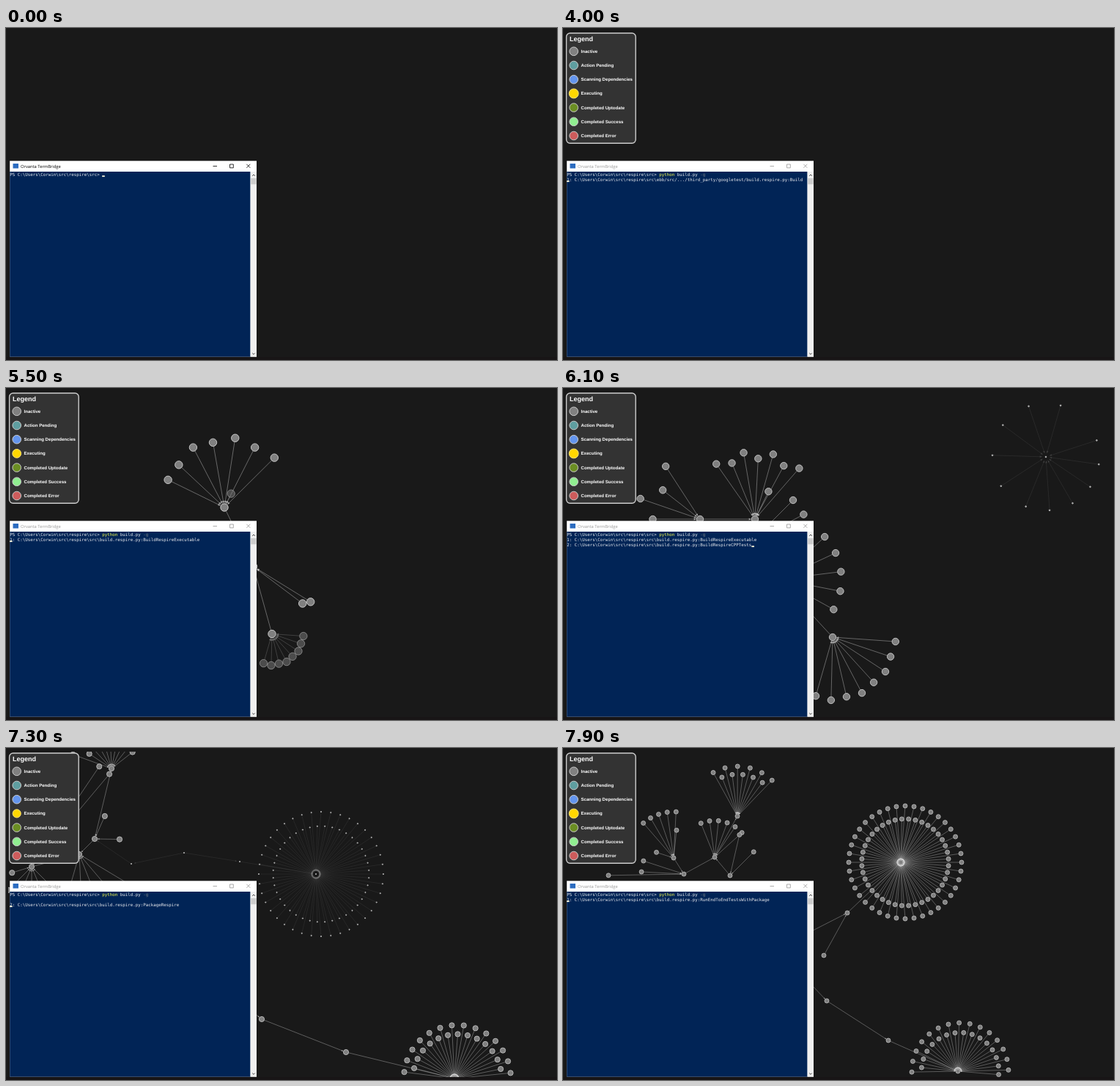
Recreate the animation shown at these times as an HTML page with a canvas. Size 752 by 453 pixels, loop 8000 ms.

```html
<!DOCTYPE html>
<html lang="en">
<head>
<meta charset="utf-8">
<title>Build graph</title>
<style>
html, body { margin: 0; width: 752px; height: 453px; overflow: hidden; background: #191919; }
canvas, svg { position: absolute; left: 0; top: 0; display: block; }
text { white-space: pre; text-rendering: geometricPrecision; }
.term text { font: 5.825px "DejaVu Sans Mono", "Liberation Mono", monospace; fill: #eeedf0; }
.legend text { font: bold 6.1px "Liberation Sans", Arial, sans-serif; fill: #fff; }
.legend .head { font-size: 9px; }
.bar { --ink: #000; }
.bar.idle { --ink: #999; }
.bar text { font: 5.8px "Open Sans", "Noto Sans", sans-serif; fill: var(--ink); }
.bar path { fill: none; stroke: var(--ink); stroke-width: .8; }
</style>
</head>
<body>
<canvas id="graph" width="752" height="453"></canvas>
<svg width="752" height="453" viewBox="0 0 752 453">
  <rect y="449" width="752" height="4" fill="#181516"/>
  <g class="legend" id="legend" visibility="hidden">
    <rect x="4.6" y="7" width="94.6" height="150.2" rx="5" fill="#333" stroke="#ccc" stroke-width="1.4"/>
    <text class="head" x="9" y="17.8">Legend</text>
  </g>
  <rect x="5.2" y="181.3" width="336.8" height="267.2" fill="#fff"/>
  <g class="bar" id="bar">
    <rect x="9.5" y="185" width="7.5" height="6.5" fill="#2c6cc0"/>
    <text x="20" y="190.6">Orvanta TermBridge</text>
    <path d="M282.5 188.5h5.5M305.5 186h4.8v4.8h-4.8zM328.3 185.8l5 5m0-5l-5 5"/>
  </g>
  <rect x="5.2" y="196" width="328.4" height="252.6" fill="#012456"/>
  <rect x="333.6" y="196" width="8.4" height="252.6" fill="#f0f0f0"/>
  <rect x="334.3" y="205" width="7.4" height="8.3" fill="#cdcdcd"/>
  <path d="M336.2 201.8l1.8-1.8 1.8 1.8M336.2 443.6l1.8 1.8 1.8-1.8" fill="none" stroke="#444"/>
  <g class="term">
    <text id="prompt" x="5.2" y="202"></text>
    <text x="131.2" y="202"><tspan id="exe" fill="#ffff4d"></tspan><tspan id="arg"></tspan><tspan id="flag" fill="#7d8086"></tspan></text>
    <text id="row1" x="5.2" y="209"></text>
    <text id="row2" x="5.2" y="216"></text>
    <rect id="cursor" width="3.6" height="1.8" fill="#fef9dc"/>
  </g>
</svg>
<script>
const LOOP = 8000, STEP = 100, BUSY = 3700, CHAR = 3.505;
const $ = id => document.getElementById(id);
const lerp = (a, b, p) => a + (b - a) * p;
const clamp = v => Math.max(0, Math.min(1, v));

/* Legend */
const states = [
  ['Inactive', '#808080'], ['Action Pending', '#5f9ea0'], ['Scanning Dependencies', '#6495ed'],
  ['Executing', '#ffd700'], ['Completed Uptodate', '#6b8e23'],
  ['Completed Success', '#90ee90'], ['Completed Error', '#cd5c5c']
];
$('legend').insertAdjacentHTML('beforeend', states.map(([label, color], i) => {
  const y = 31.8 + i * 19.2, hot = label === 'Executing';
  return `<circle ${hot ? 'id="pulse"' : ''} cx="14.7" cy="${y}" r="5.8" fill="${color}"
    stroke="${hot ? '#ffe680' : '#ccc'}"/><text x="24.5" y="${y + 1.9}">${label}</text>`;
}).join(''));

/* Terminal */
const root = 'C:\\Users\\Corwin\\src\\respire\\src';
const command = 'python build.py -g';
const job = (n, path) => `${n}: ${root}\\${path}`;
const ebb = job(1, 'ebb/src/build.respire.py:Build');
const gtest = job(1, 'ebb/src/.../third_party/googletest/build.respire.py:Build');
const exe = job(1, 'build.respire.py:BuildRespireExecutable');
// start, first row, second row, cursor row, cursor at the end of its row
const output = [
  [0, '', '', 1, false],
  [3700, ebb, '', 1, true],
  [3900, gtest, '', 1, false],
  [4400, gtest, job(2, 'ebb/src/build.respire.py:Build'), 2, true],
  [4700, ebb, '', 1, true],
  [5300, exe, '', 1, false],
  [5800, exe, job(2, 'build.respire.py:BuildRespireCPPTests'), 2, true],
  [6500, job(1, 'build.respire.py:BuildRespireCPPTests'), '', 1, true],
  [7000, '', job(2, 'build.respire.py:PackageRespire'), 2, false],
  [7600, job(1, 'build.respire.py:RunEndToEndTestsWithPackage'), '', 1, false]
];
$('prompt').textContent = `PS ${root}>`;

function drawTerminal(t) {
  const keys = (t - 1000) / STEP + 1 - (t >= 2300 ? 1 : 0);
  const n = Math.max(0, Math.min(command.length, keys));
  const typed = command.slice(0, n);
  $('exe').textContent = typed.slice(0, 7);
  $('arg').textContent = typed.slice(7, 16);
  $('flag').textContent = typed.slice(16);

  const [, a, b, line, atEnd] = output.filter(o => o[0] <= t).pop();
  $('row1').textContent = a;
  $('row2').textContent = b;

  const typing = t < 3100;
  const row = typing ? 0 : line;
  const col = typing ? 36 + n : atEnd ? [a, b][line - 1].length : 0;
  const off = [[1500, 1700], [2800, 3000], [3200, BUSY]].some(([s, e]) => t >= s && t < e);
  $('cursor').setAttribute('x', 5 + col * CHAR);
  $('cursor').setAttribute('y', 201.3 + row * 7);
  $('cursor').setAttribute('visibility', off ? 'hidden' : 'visible');
}

/* Graph: hubs with fans of leaves, moving between poses */
const poseTime = [4100, 4900, 6100, 7300, 7900];
const poseSize = [5.8, 5.7, 4.7, 3.6, 3];

// Leaves on an arc in degrees; every second one at depth times the radius
function fan(count, radius, from, to = from, depth = 1, drift = 0) {
  return Array.from({ length: count }, (_, i) => {
    const a = lerp(from, to, count > 1 ? i / (count - 1) : 0) * Math.PI / 180;
    const r = i % 2 ? radius * depth : radius;
    return { x: drift + r * Math.cos(a), y: r * Math.sin(a) };
  });
}

function hub(x, y, ...fans) {
  const leaves = fans.flat().map(l => ({ x: x + l.x, y: y + l.y }));
  return { x, y, leaves, grow: 1, show: 1 };
}

// A hub that has only just appeared
const seed = (...args) => ({ ...hub(...args), grow: 0 });

const clusters = {
  A: {
    1: hub(334, 147, fan(7, 101, 180, 319)),
    2: hub(262, 179, fan(7, 92, 235, 311, .9), fan(1, 42, 296)),
    3: hub(144, 28, fan(10, 56, 200, 322, .65)),
    4: hub(238, 93, fan(11, 68, 241, 314, .84))
  },
  B: {
    1: hub(380, 226, fan(2, 99, 34, 59), fan(3, 150, 126, 179)),
    2: hub(295, 261, fan(5, 85, 29, -43))
  },
  C: { 1: hub(379, 243, fan(1, 107, 81)) },
  D: { 1: hub(479, 236, fan(3, 105, -30, 35)) },
  E: { 1: hub(451, 181) },
  F: { 1: hub(358, 331), 2: hub(368, 340, fan(8, 86, 4, 106, .97)) },
  G: { 1: hub(350, 441) },
  J: { 2: hub(256, 211, fan(2, 82, -45, -28)) },
  X: {
    2: hub(187, 179, fan(4, 86, 237, 180, .75)),
    3: hub(100, 145, fan(5, 80, 106, 31)),
    4: hub(207, 149, fan(6, 50, 248, 318))
  },
  W: {
    3: hub(121, 124, fan(2, 34, -66, 1)),
    4: hub(228, 174, fan(2, 57, -77, -45, .8))
  },
  Y: {
    3: hub(35, 162, fan(1, 28, 163), fan(2, 165, -56, -50), fan(5, 45, 135, 45)),
    4: hub(165, 172, fan(1, 103, 179), fan(2, 58, 183, 198))
  },
  Z: { 4: hub(151, 150, fan(5, 63, 229, 273), fan(2, 38, 276, 198, .65)) },
  N1: { 3: seed(319, 155), 4: hub(388, 225) },
  N2: { 3: seed(243, 143), 4: hub(356, 283) },
  N3: { 3: seed(171, 158), 4: hub(300, 270) },
  M0: { 3: hub(290, 322), 4: hub(320, 303) },
  M1: { 3: hub(349, 370), 4: hub(360, 345) },
  M2: { 3: hub(464, 415), 4: hub(444, 399) },
  T: {
    2: seed(659, 94, fan(5, 73, 147, 286), fan(6, 73, 342, 472)),
    3: hub(612, 451, fan(27, 73, 187, 354, .83, 4)),
    4: hub(539, 441, fan(30, 66, 179, 365, .8, 3))
  },
  U: {
    3: seed(423, 172, fan(80, 85, 0, 355.5, .77, 7)),
    4: hub(461, 156, fan(80, 77, 0, 355.5, .77, 6))
  }
};

// from, to, poses in which the link is there
const links = [
  ['A', 'B', '12'], ['D', 'B', '1'], ['D', 'C', '1'], ['F', 'B', '12'], ['F', 'C', '1'],
  ['C', 'E', '1'], ['G', 'F', '1'], ['X', 'A', '24'], ['J', 'A', '2'], ['A', 'W', '3'],
  ['W', 'X', '34'], ['Y', 'X', '34'], ['Z', 'Y', '4'], ['N3', 'W', '3'], ['N2', 'N3', '3'],
  ['N2', 'N1', '34'], ['N3', 'N1', '4'], ['N1', 'U', '34'],
  ['M0', 'M1', '34'], ['M1', 'M2', '34'], ['M2', 'T', '34']
];

const ctx = $('graph').getContext('2d');
const radius = (size, grow) => size * lerp(.18, 1, grow);

function edge(from, to, size, grow, show) {
  const dx = to.x - from.x, dy = to.y - from.y, len = Math.hypot(dx, dy);
  if (len < size * 2 || show <= 0) return;
  const ux = dx / len, uy = dy / len, head = size * .65, w = size * .3;
  const rim = radius(size, grow), tip = size * 1.12;
  const tx = to.x - ux * tip, ty = to.y - uy * tip;
  const bx = tx - ux * head, by = ty - uy * head;
  ctx.globalAlpha = show * lerp(.14, .66, grow);
  ctx.strokeStyle = '#c4c4c4';
  ctx.lineWidth = .4 + size * .06;
  ctx.beginPath();
  ctx.moveTo(from.x + ux * rim, from.y + uy * rim);
  ctx.lineTo(tx, ty);
  ctx.stroke();
  ctx.fillStyle = '#ddd';
  ctx.beginPath();
  ctx.moveTo(tx, ty);
  ctx.lineTo(bx - uy * w, by + ux * w);
  ctx.lineTo(bx + uy * w, by - ux * w);
  ctx.fill();
}

function node(p, size, grow, show) {
  if (show <= 0) return;
  ctx.globalAlpha = show;
  ctx.fillStyle = '#808080';
  ctx.strokeStyle = '#ccc';
  ctx.lineWidth = .35 + size * .12;
  ctx.beginPath();
  ctx.arc(p.x, p.y, radius(size, grow), 0, 2 * Math.PI);
  ctx.fill();
  ctx.stroke();
}

const gone = c => ({ ...c, grow: 0, show: 0, leaves: [] });

function blend(poses, k, p) {
  let a = poses[k], b = poses[k + 1];
  if (!a && !b) return null;
  const f = a && b ? p : a ? clamp(2 * p) : clamp(2 * p - 1);
  a = a || gone(b);
  b = b || gone(a);
  const mix = (u, v) => ({ x: lerp(u.x, v.x, f), y: lerp(u.y, v.y, f), show: lerp(u.show, v.show, f) });
  // a leaf without a partner grows out of its hub or folds into it
  const leaf = (c, i) => c.leaves[i] ? { ...c.leaves[i], show: 1 } : { x: c.x, y: c.y, show: 0 };
  const count = Math.max(a.leaves.length, b.leaves.length);
  const leaves = Array.from({ length: count }, (_, i) => mix(leaf(a, i), leaf(b, i)));
  return { ...mix(a, b), grow: lerp(a.grow, b.grow, f), leaves };
}

function drawGraph(t) {
  ctx.clearRect(0, 0, 752, 453);
  if (t < poseTime[0]) return;
  let k = 0;
  while (k < 3 && t >= poseTime[k + 1]) k++;
  const p = clamp((t - poseTime[k]) / (poseTime[k + 1] - poseTime[k]));
  const size = lerp(poseSize[k], poseSize[k + 1], p);
  const now = {};
  for (const name in clusters) {
    const c = blend(clusters[name], k, p);
    if (c) now[name] = c;
  }
  ctx.save();
  ctx.beginPath();
  ctx.rect(3, 5, 747, 447);
  ctx.clip();
  for (const [from, to, when] of links) {
    const a = now[from], b = now[to];
    if (!a || !b) continue;
    const on = lerp(when.includes(k) ? 1 : 0, when.includes(k + 1) ? 1 : 0, p);
    edge(a, b, size, Math.min(a.grow, b.grow), on * Math.min(a.show, b.show));
  }
  for (const c of Object.values(now)) {
    for (const l of c.leaves) edge(l, c, size, c.grow, l.show * c.show);
    for (const l of c.leaves) node(l, size, c.grow, l.show * c.show);
    node(c, size, c.grow, c.show);
  }
  ctx.restore();
}

function frame() {
  const t = Math.floor(performance.now() % LOOP / STEP) * STEP;
  const busy = t >= BUSY;
  $('legend').setAttribute('visibility', busy ? 'visible' : 'hidden');
  $('bar').classList.toggle('idle', busy);
  $('pulse').setAttribute('r', 5.9 + .55 * Math.cos((t - 4000) / 1000 * Math.PI));
  drawTerminal(t);
  drawGraph(t);
  requestAnimationFrame(frame);
}
frame();
</script>
</body>
</html>
```
